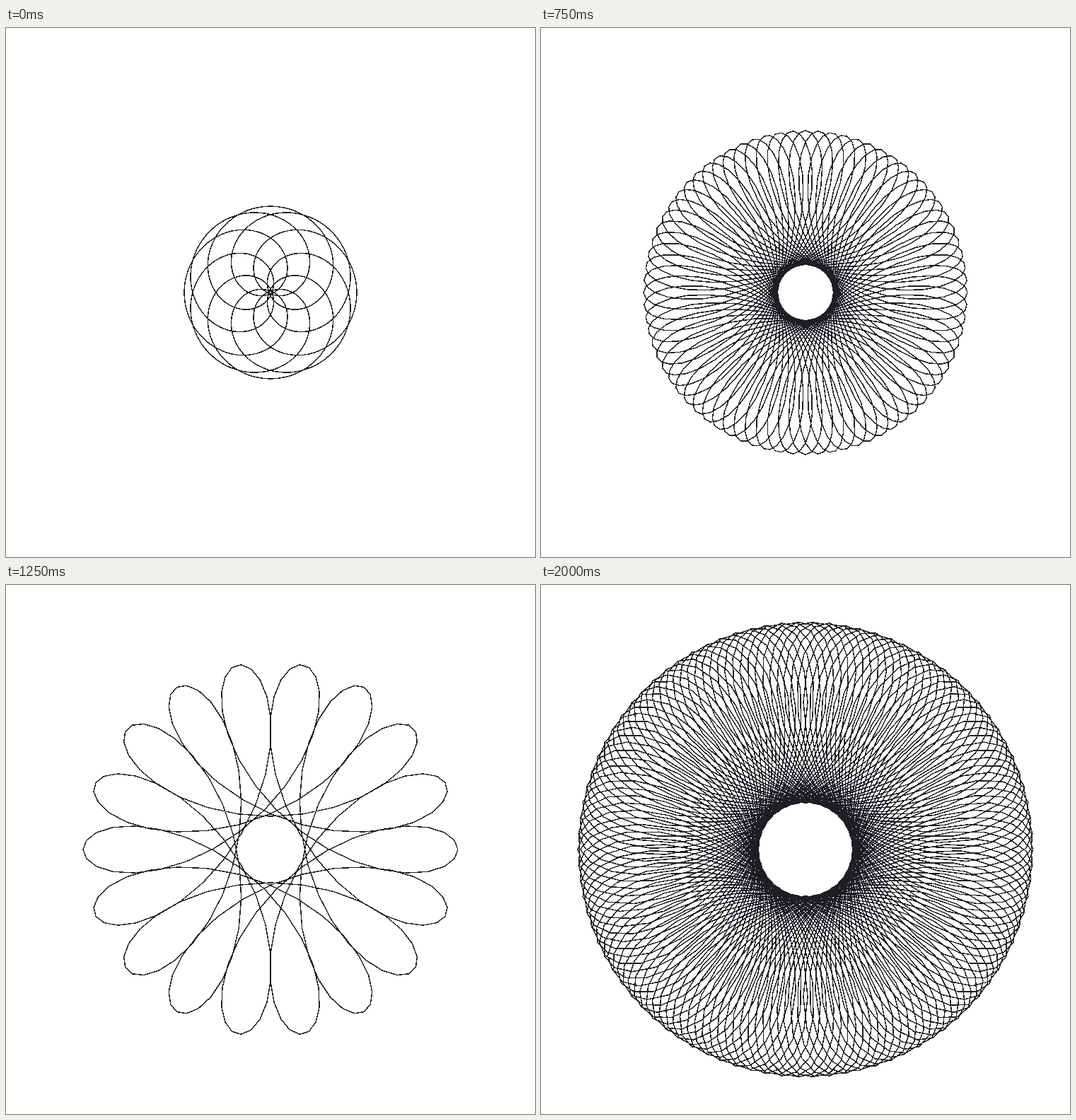
An HTML page with a canvas that plays this animation: 748x748 px, repeating every 2250 ms.

```html
<!DOCTYPE html>
<html lang="en">
<head>
<meta charset="utf-8">
<title>Spirograph</title>
<style>
  html, body { margin: 0; width: 100%; height: 100%; overflow: hidden; background: #fff; }
  canvas { display: block; width: 748px; height: 748px; }
</style>
</head>
<body>
<canvas id="stage" width="748" height="748"></canvas>
<script>
const SIZE = 748, MID = 374, HOLD = 250;
const INK = 0xff241e1e, PAPER = 0xffffffff;
const STEP = Math.PI / 30;

// a, b: arm lengths; p: turns of the first arm; q: turns of the second
const figures = [
  { a: 62, b: 60, p: 11, q: 3 },
  { a: 74, b: 47, p: 27, q: -5 },
  { a: 126, b: 63, p: 149, q: -95 },
  { a: 134, b: 95, p: 23, q: -53 },
  { a: 137, b: 101, p: 23, q: -93 },
  { a: 156, b: 109, p: 5, q: -13 },
  { a: 175, b: 115, p: 11, q: -31 },
  { a: 187.5, b: 115.5, p: 38, q: -79 },
  { a: 194, b: 128, p: 37, q: -113 }
];

const ctx = document.getElementById('stage').getContext('2d', { willReadFrequently: true });
ctx.lineWidth = 1.45;
ctx.lineJoin = 'round';

function render({ a, b, p, q }) {
  ctx.clearRect(0, 0, SIZE, SIZE);
  ctx.beginPath();
  for (let n = 0; n <= 60 * p; n++) {
    const t = n * STEP, u = t * q / p;
    ctx.lineTo(
      MID + a * Math.cos(t) + b * Math.cos(u),
      MID - a * Math.sin(t) - b * Math.sin(u)
    );
  }
  ctx.stroke();

  // Hard edges: every pixel is either ink or paper
  const img = ctx.getImageData(0, 0, SIZE, SIZE);
  const px = new Uint32Array(img.data.buffer);
  for (let i = 0; i < px.length; i++) px[i] = px[i] >>> 24 > 127 ? INK : PAPER;
  return img;
}

const pictures = figures.map(render);
const start = performance.now();
let shown = -1;

function tick() {
  const now = Math.max(0, performance.now() - start);
  const i = Math.floor(now / HOLD) % pictures.length;
  if (i !== shown) {
    ctx.putImageData(pictures[i], 0, 0);
    shown = i;
  }
  requestAnimationFrame(tick);
}
tick();
</script>
</body>
</html>
```
